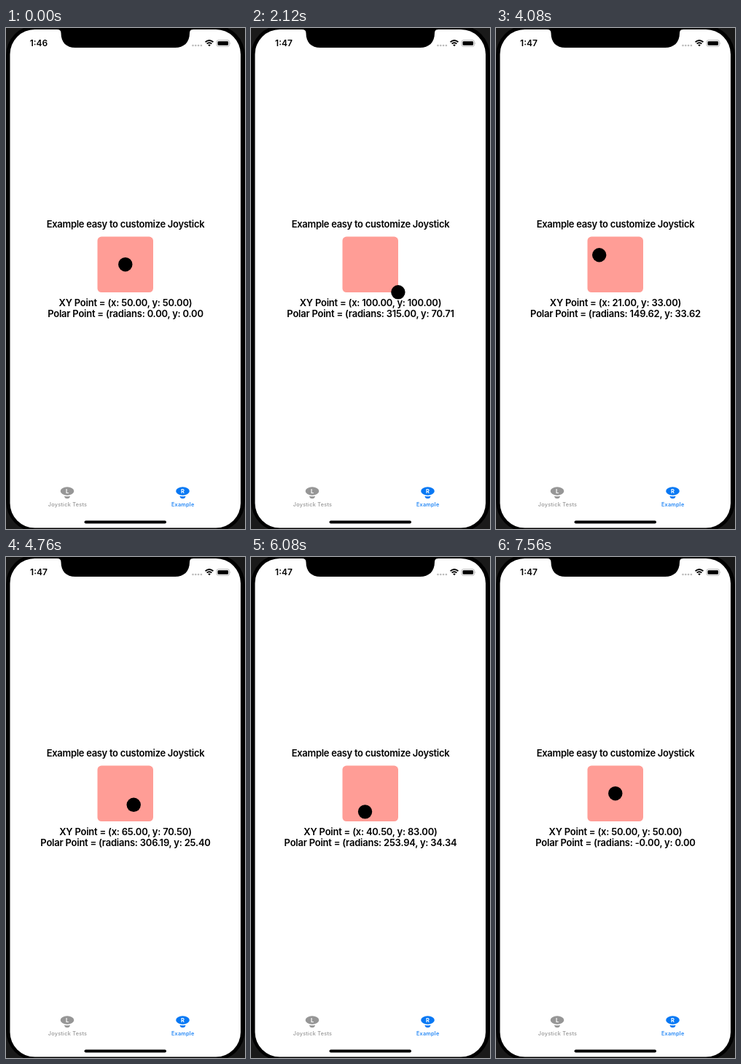
Recreate the animation shown at these times as an HTML page. Size 328 by 688 pixels, loop 7640 ms.

```html
<!DOCTYPE html>
<html lang="en">
<head>
<meta charset="utf-8">
<title>Joystick example</title>
<style>
  html, body { margin: 0; width: 100%; height: 100%; overflow: hidden; background: #000; }
  svg { display: block; width: 328px; height: 688px; }
  text { font-family: Inter, Roboto, sans-serif; text-anchor: middle; }
  .body { font-size: 13px; font-weight: 600; letter-spacing: -.23px; }
  .title { letter-spacing: -.31px; }
  .tab { font-size: 7.3px; font-weight: 500; letter-spacing: .26px; }
  .letter { font-size: 7.5px; font-weight: 700; fill: #fff; }
</style>
</head>
<body>
<svg viewBox="0 0 328 688">
  <rect width="328" height="688" fill="#1a1a1a"/>
  <rect y="-4" width="328" height="696" rx="42"/>
  <rect x="5.5" y="2" width="316.5" height="684.5" rx="34" fill="#fff"/>
  <path d="M70 0V2Q75.5 2 75.5 7C75.5 20 83 27 95 27H232C244 27 252 20 252 7Q252 2 257.5 2V0Z"/>

  <text id="clock" x="45" y="25" font-size="12" font-weight="600"></text>
  <g fill="#bbb">
    <circle cx="256.5" cy="24" r="1.3"/><circle cx="260.3" cy="24" r="1.3"/>
    <circle cx="264.1" cy="24" r="1.3"/><circle cx="267.9" cy="24" r="1.3"/>
  </g>
  <g fill="none" stroke="#000" stroke-width="1.8">
    <path d="M273.6 19.3Q279 14.600 284.4 19.3M275.6 21.6Q279 18.8 282.4 21.6"/>
    <path d="M279 25.2L277.2 23.2Q279 22 280.8 23.2Z" fill="#000" stroke="none"/>
  </g>
  <rect x="289" y="16.7" width="17.6" height="8.6" rx="2.5" fill="none" stroke="#aaa" stroke-width=".8"/>
  <rect x="290.5" y="18.2" width="14.6" height="5.6" rx="1.3"/>
  <path d="M307.6 19.5Q309.2 21 307.6 22.5Z" fill="#aaa"/>

  <text class="body title" x="164" y="273.5">Example easy to customize Joystick</text>
  <rect x="125.5" y="286.6" width="76.5" height="76.4" rx="5.5" fill="#ff9d96"/>
  <text class="body" id="xy" x="164" y="381.5"></text>
  <text class="body" id="polar" x="164" y="397"></text>
  <circle id="knob" r="9.7"/>

  <defs>
    <g id="stick">
      <ellipse cy="636" rx="9.3" ry="5.8"/>
      <path d="M-4 642.7Q0 644 4 642.7Q3.5 646.2 0 646.2Q-3.5 646.2 -4 642.7Z"/>
    </g>
  </defs>
  <g fill="#969696">
    <use href="#stick" x="84"/>
    <text class="letter" x="84" y="638.8">L</text>
    <text class="tab" x="84.5" y="657.3">Joystick Tests</text>
  </g>
  <g fill="#0878f4">
    <use href="#stick" x="242.5"/>
    <text class="letter" x="242.5" y="638.8">R</text>
    <text class="tab" x="242.7" y="657.3">Example</text>
  </g>
  <rect x="107.5" y="676.5" width="112.5" height="4" rx="2"/>
</svg>
<script>
const LOOP = 7640, STEP = 40, PRESS = 1040, RELEASE = 7560;
const CORNER = 71; // reach beyond which the knob is held in a corner
const $ = id => document.getElementById(id);

// Finger spiral: time in ms, counter-clockwise angle in degrees, distance from centre
const path = [
  [1200, 128, 8], [2120, 315, CORNER], [2560, 315, CORNER], [2960, 405, CORNER],
  [3240, 405, CORNER], [3320, 450, CORNER], [4040, 500, 34], [4760, 666.19, 25.4],
  [6080, 973.94, 34.34], [6680, 1131.95, 29.21], [RELEASE, 1350, 26]
];

const clamp = (v, lo, hi) => Math.min(hi, Math.max(lo, v));
const axis = v => Math.round(2 * clamp(50 + v, 0, 100)) / 2;

function pointAt(t) {
  if (t < PRESS || t >= RELEASE) return [50, 50];
  const i = Math.max(1, path.findIndex(k => k[0] > t));
  const [t0, a0, r0] = path[i - 1], [t1, a1, r1] = path[i];
  const p = clamp((t - t0) / (t1 - t0), 0, 1);
  const a = (a0 + (a1 - a0) * p) * Math.PI / 180, r = r0 + (r1 - r0) * p;
  return [axis(r * Math.cos(a)), axis(-r * Math.sin(a))];
}

function draw(now) {
  const t = Math.floor(now % LOOP / STEP) * STEP;
  const [x, y] = pointAt(t);
  const deg = (Math.atan2(50 - y, x - 50) * 180 / Math.PI + 360) % 360;
  const sign = t >= RELEASE ? "-" : "";
  $("knob").setAttribute("cx", 125.7 + x * .762);
  $("knob").setAttribute("cy", 286.6 + y * .762);
  $("xy").textContent = `XY Point = (x: ${x.toFixed(2)}, y: ${y.toFixed(2)})`;
  $("polar").textContent =
    `Polar Point = (radians: ${sign}${deg.toFixed(2)}, y: ${Math.hypot(x - 50, y - 50).toFixed(2)}`;
  $("clock").textContent = t < 1600 ? "1:46" : "1:47";
  requestAnimationFrame(draw);
}
requestAnimationFrame(draw);
</script>
</body>
</html>
```
